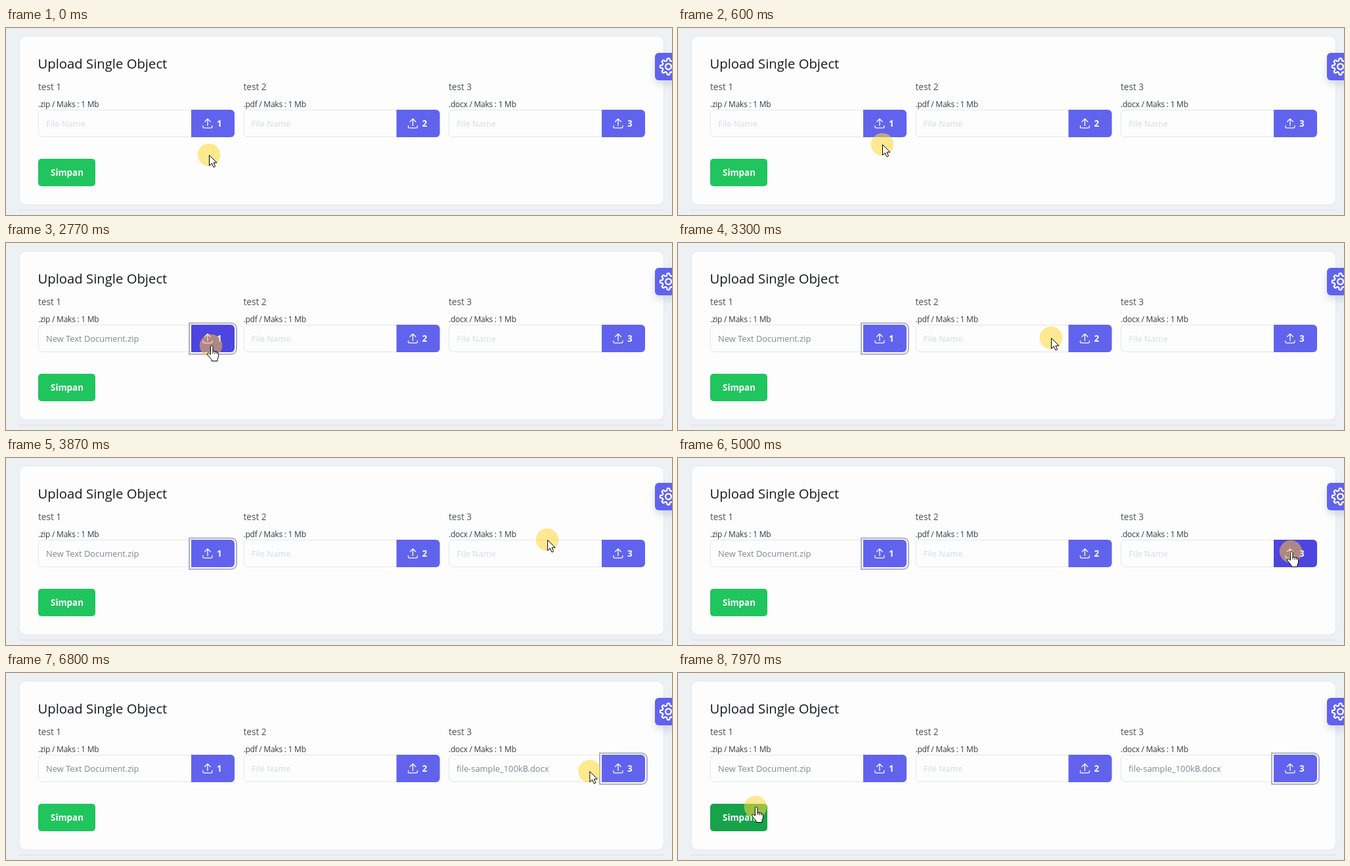
An HTML page that plays this animation: 1014 px wide and 286 px high, repeating every 8000 ms.

```html
<!DOCTYPE html>
<html lang="id">
<head>
<meta charset="utf-8">
<title>Upload Single Object</title>
<style>
  html, body { margin: 0; width: 100%; height: 100%; overflow: hidden; background: #edf1f4; }
  svg { display: block; }
  text { font-family: "Open Sans", "Noto Sans", sans-serif; font-size: 12.9px; white-space: pre; }
  .title { font-size: 20.3px; fill: #16181d; }
  .label { font-size: 13.6px; fill: #4b5058; }
  .hint { font-size: 12px; letter-spacing: -.25px; fill: #34383f; }
  .strong { font-size: 13.4px; font-weight: 700; fill: #fff; }
  .line { fill: none; stroke: #fff; stroke-linecap: round; stroke-linejoin: round; }
  .pointer { fill: #fff; stroke: #000; stroke-linejoin: round; }
</style>
</head>
<body>
<svg width="1014" height="286" viewBox="0 0 1014 286">
  <defs>
    <filter id="glow" x="-100%" y="-100%" width="300%" height="300%"><feGaussianBlur stdDeviation="6"/></filter>
  </defs>
  <rect x="20.5" y="12.5" width="981" height="258" rx="10" fill="#fdfdfd" stroke="#e2e8f0"/>
  <path d="M20 278.5H1002" stroke="#d9dfe8"/>
  <text class="title" x="48.5" y="62">Upload Single Object</text>
  <g id="fields"></g>
  <rect id="save" x="49" y="200" width="87" height="42" rx="5"/>
  <text class="strong" x="68" y="226">Simpan</text>
  <rect x="988" y="44" width="42" height="42" rx="6" fill="#94a3b8" opacity=".35" filter="url(#glow)"/>
  <rect x="988" y="38" width="42" height="42" rx="6" fill="#6163ee"/>
  <g class="line" transform="translate(1008.5 59)" stroke-width="2.2">
    <path id="gear"/><circle r="4.4"/>
  </g>
  <g id="cursor">
    <circle id="halo" r="17.3"/>
    <path id="arrow" class="pointer" d="M.5 .5V16.5L4.2 13 7 19 9.6 17.8 6.9 12H12Z"/>
    <g id="hand" class="pointer" transform="translate(1)">
      <path d="M-1.6 1.6a1.8 1.8 0 0 1 3.6 0V8L8 9.4q2.6.7 2.6 3.4v3q0 2.2-1.6 4.2v3.5H0V21.5L-6 14q-1.2-2.8 1.5-2.9L-1.6 13.5Z"/>
      <path d="M2 8v4M5 9v3.5M8 9.8v3" fill="none"/>
    </g>
  </g>
</svg>
<script>
const LOOP = 8000;
const $ = id => document.getElementById(id);

// time, x, y of the pointer tip
const path = [
  [0, 309, 194], [150, 309, 194], [600, 311, 178], [1000, 312, 157], [2900, 312, 157],
  [3370, 612, 143], [3870, 824, 125], [4170, 864, 129], [4650, 933, 143], [5300, 933, 143],
  [5700, 931, 143], [6450, 931, 143], [6800, 890, 150], [7000, 560, 180], [7230, 118, 205],
  [LOOP, 118, 205]
];

const fields = [
  { x: 49, type: "zip", file: "New Text Document.zip", from: 1700, ring: [1700, 5400] },
  { x: 361.5, type: "pdf", file: "", from: LOOP, ring: [LOOP, LOOP] },
  { x: 674, type: "docx", file: "file-sample_100kB.docx", from: 5400, ring: [5400, LOOP] }
];

$("fields").innerHTML = fields.map(({ x, type }, i) => `
  <g transform="translate(${x})">
    <text class="label" y="95">test ${i + 1}</text>
    <text class="hint" y="121">.${type} / Maks : 1 Mb</text>
    <rect x=".5" y="125.5" width="298" height="41" rx="6" fill="#fdfdfd" stroke="#e2e6ec"/>
    <text id="name${i}" x="12" y="151"></text>
    <path id="ring${i}" d="M230 122.5H294a8 8 0 0 1 8 8V162a8 8 0 0 1-8 8H230Z"
      fill="#fdfdfd" stroke="#adb0c4" stroke-width="2"/>
    <path id="button${i}" d="M233 125H293a6 6 0 0 1 6 6V161a6 6 0 0 1-6 6H233Z"/>
    <path class="line" transform="translate(247.5 135.5) scale(.87)" stroke-width="1.5"
      d="M4 16v2a2 2 0 0 0 2 2h12a2 2 0 0 0 2-2v-2M7 9l5-5 5 5M12 4v12"/>
    <text class="strong" x="272" y="151">${i + 1}</text>
  </g>`).join("");

// eight rounded teeth
$("gear").setAttribute("d", "M" + Array.from({ length: 96 }, (_, i) => {
  const a = i / 96 * 2 * Math.PI;
  const r = 10.9 + 1.7 * Math.tanh(2.5 * Math.cos(8 * a));
  return `${(r * Math.cos(a)).toFixed(2)} ${(r * Math.sin(a)).toFixed(2)}`;
}).join("L") + "Z");

function pointerAt(t) {
  const i = path.findIndex(p => p[0] > t);
  const [t0, x0, y0] = path[i - 1], [t1, x1, y1] = path[i];
  const k = (t - t0) / (t1 - t0);
  return [x0 + (x1 - x0) * k, y0 + (y1 - y0) * k];
}

const show = (id, on) => $(id).setAttribute("visibility", on ? "visible" : "hidden");
const fill = (id, color) => $(id).setAttribute("fill", color);

function draw(t) {
  const [x, y] = pointerAt(t);
  const inside = (l, top, w, h) => x >= l && x < l + w && y >= top && y < top + h;
  let overUpload = false;

  fields.forEach((f, i) => {
    const over = inside(f.x + 233, 125, 66, 42);
    overUpload ||= over;
    fill("button" + i, over ? "#4d45e0" : "#6163ee");
    show("ring" + i, t >= f.ring[0] && t < f.ring[1]);
    const filled = t >= f.from;
    $("name" + i).textContent = filled ? f.file : "File Name";
    fill("name" + i, filled ? "#80858d" : "#d5dae0");
  });

  const overSave = inside(49, 200, 87, 42);
  fill("save", overSave ? "#16a34a" : "#20c55d");
  fill("halo", overUpload ? "rgba(255,190,65,.54)" : "rgba(255,216,62,.57)");
  show("hand", overUpload || overSave);
  show("arrow", !overUpload && !overSave);
  $("cursor").setAttribute("transform", `translate(${x.toFixed(2)} ${y.toFixed(2)})`);
}

const start = performance.now();
function tick() {
  draw((performance.now() - start) % LOOP);
  requestAnimationFrame(tick);
}
tick();
</script>
</body>
</html>
```
